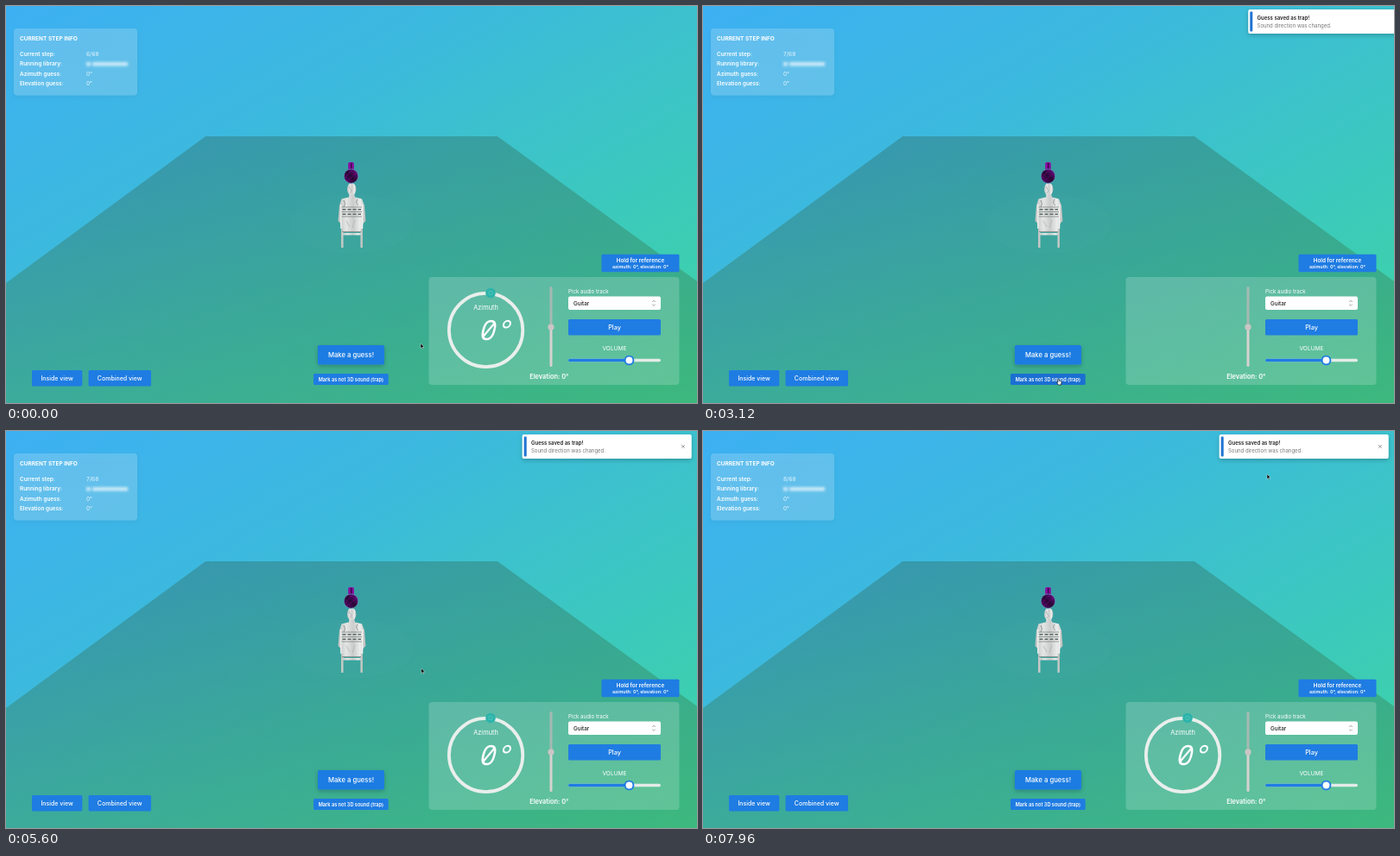
An HTML page that plays this animation: 800x460 px, repeating every 8000 ms.

```html
<!DOCTYPE html>
<html lang="en">
<head>
<meta charset="utf-8">
<title>Sound direction test</title>
<style>
html, body { margin: 0; width: 100%; height: 100%; overflow: hidden; }
svg { display: block; width: 800px; height: 460px; font-family: Inter, "Open Sans", sans-serif; fill: #fff; }
.btn { fill: #1f7ce2; }
.btn.hover { fill: #1b6fd2; }
.panel { fill: #fff; fill-opacity: .18; }
</style>
</head>
<body>
<svg id="stage" viewBox="0 0 800 460">
  <defs>
    <linearGradient id="sky" gradientUnits="userSpaceOnUse" x1="0" y1="0" x2="399" y2="691">
      <stop stop-color="#3db0f3"/><stop offset=".33" stop-color="#3cb9de"/>
      <stop offset=".5" stop-color="#3cc1ce"/><stop offset=".79" stop-color="#3ccdb4"/>
      <stop offset="1" stop-color="#3ed6a0"/>
    </linearGradient>
    <linearGradient id="floor" x2="0" y2="1">
      <stop stop-color="#2d5039" stop-opacity=".3"/><stop offset="1" stop-color="#3c823c" stop-opacity=".35"/>
    </linearGradient>
    <linearGradient id="stone">
      <stop stop-color="#bfc2c1"/><stop offset=".3" stop-color="#e4e6e5"/>
      <stop offset=".55" stop-color="#c9cccb"/><stop offset=".8" stop-color="#eceeed"/><stop offset="1" stop-color="#b4b8b6"/>
    </linearGradient>
    <linearGradient id="ball" x1="0" y1="1" x2="1" y2="0">
      <stop stop-color="#5c0a70"/><stop offset=".5" stop-color="#2a0634"/><stop offset="1" stop-color="#7a0c92"/>
    </linearGradient>
    <filter id="blur" x="-20%" y="-100%" width="140%" height="300%"><feGaussianBlur stdDeviation="1.7"/></filter>
    <filter id="shadow" x="-20%" y="-40%" width="140%" height="200%">
      <feDropShadow dx="0" dy="2" stdDeviation="2.5" flood-color="#000" flood-opacity=".22"/>
    </filter>
  </defs>

  <rect width="800" height="460" fill="url(#sky)"/>
  <path d="M231 151H569L800 319V460H0V321Z" fill="url(#floor)"/>
  <ellipse cx="400" cy="252" rx="72" ry="34" fill-opacity=".012"/>

  <!-- listener on a chair -->
  <g fill="url(#stone)">
    <path d="M397.500 217H403L404 221.500 412 223.500 415 231 416.500 249 413.500 252 411.500 262H389L387.500 252 384.500 249 386 231 388.500 223.500 397 221.500Z"/>
    <ellipse cx="400.200" cy="212.200" rx="5.200" ry="7.200"/>
    <path d="M388 258H390.500V280H388ZM410.500 258H413V280H410.500ZM389 263H412V265.500H389Z"/>
  </g>
  <g fill="none" stroke="#7d8682" stroke-width=".8">
    <path d="M388 233H412M388 238.500H412M388 244H412M389 261.500H411M391 225Q394 229 391 233M407 224Q404 228 408 231"/>
    <path d="M389.500 235.800H411M389.500 241.300H411" stroke="#596763" stroke-width="1.600" stroke-dasharray="4 2"/>
    <path d="M387.800 230V258M412.600 230V258" stroke="#f2f4f3" stroke-width="1.300"/>
    <path d="M394 249L398 256M404 248L401 257" stroke="#aeb4b1"/>
    <path d="M397 209L400 214 398 217" stroke="#a7adab"/>
  </g>
  <!-- sound source -->
  <rect x="396.200" y="181" width="6.600" height="10" rx="1.800" fill="#8a0da3"/>
  <path d="M399.700 182V190" stroke="#3c0747" stroke-width="1.600"/>
  <circle cx="399.500" cy="197.200" r="8.300" fill="url(#ball)" stroke="#62a4c4" stroke-width=".7"/>
  <path d="M393 199L400 191M395 203L406 193" stroke="#830d9c" stroke-width=".9" stroke-dasharray="1.500 1.500"/>

  <!-- step info -->
  <rect class="panel" x="9" y="26" width="143" height="77.500" rx="4" filter="url(#shadow)"/>
  <g filter="url(#blur)" fill-opacity=".65">
    <rect x="93" y="65" width="5" height="4.500"/><rect x="100" y="65" width="41" height="4.500"/>
  </g>

  <!-- controls -->
  <rect class="panel" x="489.500" y="314" width="290" height="125" rx="4"/>
  <g id="dial">
    <circle cx="555.600" cy="375.500" r="42.700" fill="none" stroke="#e9efec" stroke-width="3.800"/>
    <circle cx="561" cy="332.500" r="5.800" fill="#2cb4ab"/>
    <circle cx="561" cy="332.500" r="2.200" fill="none" stroke="#65c9c0" stroke-width=".7"/>
    <text x="546.500" y="387" font-size="32" font-style="italic" style="font-family:'Noto Sans Mono',monospace">0°</text>
  </g>
  <rect x="629.500" y="325" width="3" height="47" rx="1.500" fill="#a5b9b3"/>
  <rect x="629.500" y="371" width="3" height="47" rx="1.500" fill="#d6d2d0"/>
  <circle cx="631" cy="372" r="3.600" fill="#cbc5c4"/>
  <rect x="651" y="336.500" width="107" height="15.500" rx="2"/>
  <path d="M748.200 343L750 341.200 751.800 343M748.200 345.600L750 347.400 751.800 345.600" fill="none" stroke="#777" stroke-width=".7"/>
  <rect x="651" y="408.700" width="107" height="3.600" rx="1.800" fill="#e3ebe8"/>
  <rect x="651" y="408.700" width="70" height="3.600" rx="1.800" fill="#1f7ce2"/>
  <circle cx="721.500" cy="410.500" r="4.900" stroke="#1f7ce2" stroke-width="1.900"/>

  <g id="buttons"></g>
  <g id="labels"></g>

  <g id="toast">
    <rect x="597.700" y="4" width="196" height="28" rx="2" filter="url(#shadow)"/>
    <rect x="599.700" y="6.500" width="3" height="23" rx="1" fill="#1f73d2"/>
    <path d="M782 16L785.800 19.800M785.800 16L782 19.800" stroke="#888" stroke-width=".8"/>
  </g>

  <g id="cursor">
    <path id="arrow" d="M0 0V14L3.300 11 5.500 16.200 7.800 15.200 5.600 10.200H10Z" fill="#000" stroke="#fff" stroke-width="1"/>
    <path id="hand" d="M-1.200 -2.500Q-.5 -3.200 .1 -2.300L.6 -.6 2.600 -.2Q3.300 .2 3 1.500L2.300 4H-.5L-2.400 1.500Q-2.200 .6 -1 1.200Z" stroke="#111" stroke-width=".7"/>
    <path id="beam" d="M-1.500 -3.500Q0 -3.500 0 -2.500Q0 -3.500 1.500 -3.500M0 -2.500V2.500M-1.500 3.500Q0 3.500 0 2.500Q0 3.500 1.500 3.500M-1 .8H1" fill="none" stroke="#111" stroke-width=".8"/>
  </g>
</svg>
<script>
const LOOP = 8000;
const SAVES = [2960, 7000];
const DIAL_GONE = 300;
const $ = id => document.getElementById(id);

function add(parent, tag, attrs, text = '') {
  const node = document.createElementNS($('stage').namespaceURI, tag);
  for (const key in attrs) node.setAttribute(key, attrs[key]);
  node.textContent = text;
  return parent.appendChild(node);
}

function label(parent, text, x, y, size, weight = 400, extra = {}) {
  return add(parent, 'text', { x, y, 'font-size': size, 'font-weight': weight, ...extra }, text);
}

function button(x, y, width, height, text, size, weight = 500, extra = {}) {
  const box = add($('buttons'), 'rect', { class: 'btn', x, y, width, height, rx: 1.5, ...extra });
  if (text) label($('buttons'), text, x + width / 2, y + height / 2 + size * .36, size, weight, { 'text-anchor': 'middle' });
  return box;
}

button(30, 422, 58.3, 18.5, 'Inside view', 7);
button(95.5, 422, 72.5, 18.5, 'Combined view', 7);
button(361, 393, 77, 22.5, 'Make a guess!', 7.7, 500, { filter: 'url(#shadow)' });
const trap = button(356, 426, 86.7, 13, 'Mark as not 3D sound (trap)', 5.6, 600);
button(651, 363, 107, 18.5, 'Play', 7.3);
button(689.5, 287.7, 90, 20.6);

const labels = $('labels');
const middle = { 'text-anchor': 'middle' };
label(labels, 'CURRENT STEP INFO', 16, 40.4, 6.5, 700);
['Current step:', 'Running library:', 'Azimuth guess:', 'Elevation guess:'].forEach((text, i) =>
  label(labels, text, 16, 57.8 + i * 11.5, 6.4, 600));
const dim = { 'fill-opacity': .85 };
const counter = label(labels, '', 93, 57.8, 6.6, 400, dim);
label(labels, '0°', 93, 80.8, 6.4, 400, dim);
label(labels, '0°', 93, 92.3, 6.4, 400, dim);
label(labels, 'Hold for reference', 734.5, 297, 6.3, 600, middle);
label(labels, 'azimuth: 0°, elevation: 0°', 734.5, 304.2, 5.4, 600, middle);
label(labels, 'Pick audio track', 651, 333, 6.2);
label(labels, 'Guitar', 657, 346.6, 6.3, 500, { fill: '#222' });
label(labels, 'VOLUME', 704.5, 398.6, 6.6, 400, middle);
label(labels, 'Elevation: 0°', 628.8, 432, 7.4, 600, middle);
label($('dial'), 'Azimuth', 555.5, 352, 7.4, 400, middle);
label($('toast'), 'Guess saved as trap!', 608, 16, 6, 600, { fill: '#222' });
label($('toast'), 'Sound direction was changed.', 608, 25.3, 6, 400, { fill: '#777' });

// time, x, y of the pointer
const path = [
  [0, 480, 391], [160, 480, 391], [760, 428, 436], [960, 368, 436], [1110, 432, 437], [1260, 370, 435],
  [1400, 401, 436], [1560, 428, 437], [1880, 372, 437], [2200, 370, 440], [2680, 412, 435],
  [3300, 412, 435], [4440, 612, 15], [4900, 612, 15], [6100, 402, 431], [7120, 402, 431], [7960, 653, 50], [8000, 653, 50]
];
// time, pointer scale
const growth = [[0, .4], [1000, .4], [1250, 1.6], [1620, 1.6], [1840, .4], [8000, .4]];

function sample(track, t) {
  const i = Math.max(1, track.findIndex(step => step[0] > t));
  const [a, b] = [track[i - 1], track[i]];
  const p = (t - a[0]) / (b[0] - a[0]);
  const eased = p * p * (3 - 2 * p);
  return a.slice(1).map((v, k) => v + (b[k + 1] - v) * eased);
}

const inside = (x, y, l, t, r, b) => x >= l && x <= r && y >= t && y <= b;
const show = (id, on) => $(id).setAttribute('visibility', on ? 'visible' : 'hidden');

function draw(t) {
  const [x, y] = sample(path, t);
  const [scale] = sample(growth, t);
  const overTrap = inside(x, y, 356, 426, 443, 441);
  const big = scale > .45;
  const hand = overTrap && !big;
  const beam = t > SAVES[0] && inside(x, y, 605, 9, 696, 28);
  $('cursor').setAttribute('transform', `translate(${x} ${y})`);
  $('arrow').setAttribute('transform', `scale(${scale})`);
  show('arrow', !hand && !beam);
  show('hand', hand);
  show('beam', beam);
  trap.classList.toggle('hover', overTrap);

  counter.textContent = `${6 + SAVES.filter(s => t >= s).length}/68`;
  show('dial', !SAVES.some(s => t >= s && t < s + DIAL_GONE));

  const slide = Math.min(1, Math.max(0, (t - SAVES[0]) / 270));
  $('toast').setAttribute('transform', `translate(${206 * (1 - slide) ** 2} 0)`);
  show('toast', slide > 0);
}

const start = performance.now();
function tick() {
  draw((performance.now() - start) % LOOP);
  requestAnimationFrame(tick);
}
tick();
</script>
</body>
</html>
```
